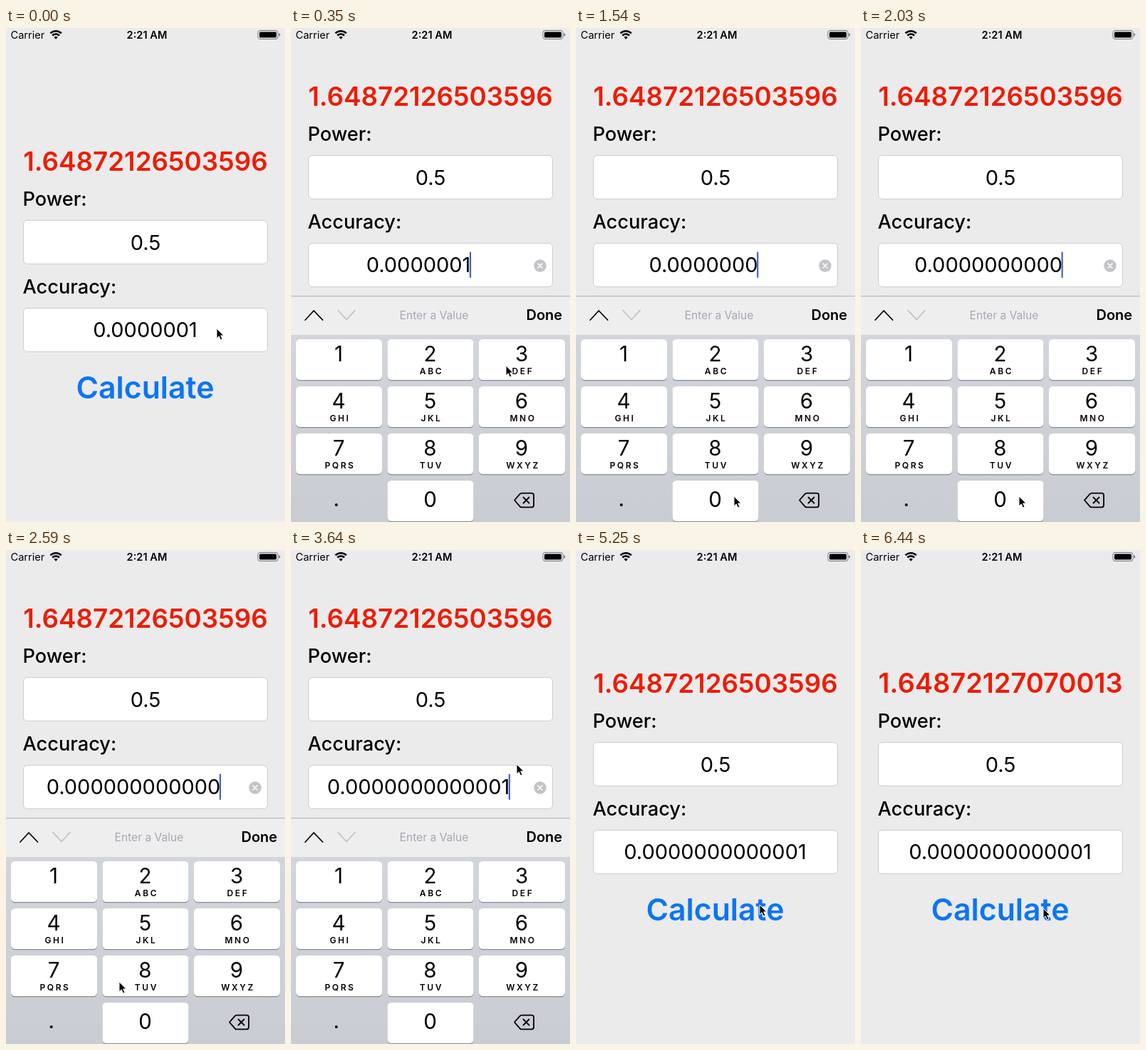
An HTML page for the animation above (6.51 s loop, 392x692 px).

```html
<!DOCTYPE html>
<html lang="en">
<head>
<meta charset="utf-8">
<title>Exponent calculator</title>
<style>
  html, body { margin: 0; width: 100%; height: 100%; overflow: hidden; background: #ebebeb; }
  svg { display: block; width: 392px; height: 692px; font-family: Inter, "Liberation Sans", sans-serif; font-optical-sizing: none; }
  .mid { text-anchor: middle; }
  .label { font-size: 27.2px; font-weight: 500; }
  .value { font-size: 29px; }
  .status { font-size: 14.6px; }
  .box { fill: #fff; stroke: #cdcdcd; }
  .letters { font-size: 12px; font-weight: 600; letter-spacing: 2.6px; }
  .line { fill: none; stroke: #000; stroke-width: 1.8; stroke-linecap: round; stroke-linejoin: round; }
</style>
</head>
<body>
<svg viewBox="0 0 392 692">
  <rect width="392" height="692" fill="#ebebeb"/>

  <g id="form">
    <text id="result" class="mid" x="196" y="200" font-weight="600" fill="#ee1c05"></text>
    <text class="label" x="23.5" y="249">Power:</text>
    <rect class="box" x="24.5" y="269.5" width="343" height="61" rx="5.5"/>
    <text class="value mid" x="196" y="310.5">0.5</text>
    <text class="label" x="23.5" y="372">Accuracy:</text>
    <rect class="box" x="24.5" y="392.5" width="343" height="61" rx="5.5"/>
    <text id="entry" class="value mid" y="433.3"></text>
    <g id="editing">
      <rect id="caret" y="404.5" width="2.2" height="36.5" rx="1" fill="#4a5fc1"/>
      <circle cx="350" cy="424" r="8.7" fill="#c4c4c8"/>
      <path d="M347 421l6 6m0-6l-6 6" stroke="#fff" stroke-width="1.6" stroke-linecap="round"/>
    </g>
    <text class="mid" x="195.5" y="519" font-size="42.8" font-weight="600" fill="#0b75f5">Calculate</text>
  </g>

  <g id="statusBar">
    <text class="status" x="6.5" y="15">Carrier</text>
    <g fill="none" stroke="#000" stroke-width="2.5">
      <path d="M62.4 7.4a11 11 0 0 1 15.4 0"/>
      <path d="M65.2 10.5a7 7 0 0 1 9.8 0"/>
    </g>
    <path d="M70.1 15.8l-2.6-2.9a3.8 3.8 0 0 1 5.2 0z"/>
    <text class="status mid" x="198" y="15" font-weight="600">2:21 AM</text>
    <rect x="354" y="3.5" width="28" height="12" rx="3" fill="none" stroke="#777"/>
    <rect x="356" y="5.5" width="24" height="8" rx="1.5"/>
    <path d="M383.3 7.3q2 .5 2 2.2t-2 2.2z" fill="#777"/>
  </g>

  <g id="keyboard">
    <linearGradient id="tray" x2="0" y2="1">
      <stop stop-color="#d2d5db"/>
      <stop offset="1" stop-color="#c9ccd2"/>
    </linearGradient>
    <rect y="375" width="392" height="55" fill="#eeeeef"/>
    <rect y="375" width="392" height="1.2" fill="#b6b7ba"/>
    <path class="line" d="M20 409l12-13 12.500 13"/>
    <path class="line" d="M66 395.500l12 13 12-13" style="stroke:#bfc1c5"/>
    <text class="mid" x="201" y="408" font-size="15.6" fill="#a5a9b3">Enter a Value</text>
    <text x="330.500" y="409.300" font-size="20" font-weight="600">Done</text>
    <rect y="430" width="392" height="262" fill="url(#tray)"/>
    <g id="keys"></g>
    <circle cx="63.700" cy="668" r="2"/>
    <path class="line" d="M314 661.500l7.500-8.600q1-1.200 2.600-1.200h14q3 0 3 3v13.600q0 3-3 3h-14q-1.600 0-2.600-1.200z"/>
    <path class="line" d="M326.500 657.500l8 8m0-8l-8 8"/>
  </g>

  <path id="pointer" d="M0 0v13.800l3.200-3 2.300 5.200 2.500-1.100-2.300-5h4.400z" stroke="#fff" stroke-width="1" stroke-linejoin="round"/>
</svg>
<script>
  const LOOP = 6510, STEP = 70;
  const KEYBOARD_HEIGHT = 317, FORM_LIFT = 91;
  const OPEN = 70, CLOSE = 4340, SLIDE = 260, ANSWER = 5600;
  const ERASE = 770, ONE = 2940;
  const ZEROS = [1470, 1680, 1860, 2030, 2200, 2380];

  // time, x, y of the pointer tip
  const PATH = [
    [0, 296, 421], [210, 296, 421], [350, 302, 473], [630, 325, 658],
    [910, 325, 658], [1330, 222, 656], [2380, 222, 656], [2590, 159, 605],
    [2870, 68, 466], [3150, 68, 466], [3640, 317, 300], [4060, 355, 402],
    [4410, 355, 402], [4900, 262, 499], [5250, 258, 497], [6440, 256, 502]
  ];

  const el = id => document.getElementById(id);
  const clamp = v => Math.min(1, Math.max(0, v));
  const easeOut = v => 1 - (1 - clamp(v)) ** 3;
  const move = (node, x, y) => node.setAttribute("transform", `translate(${x} ${y})`);

  function keyMarkup(digit, letters, col, row) {
    const x = 7 + col * 128.5, y = 436 + row * 66;
    const base = y + (digit === 0 ? 37 : 31);
    return `<rect x="${x}" y="${y + 1.3}" width="121" height="57" rx="5.5" fill="#898c91"/>
      <rect x="${x}" y="${y}" width="121" height="57" rx="5.5" fill="#fff"/>
      <text class="mid" x="${x + 60}" y="${base}" font-size="29.5">${digit}</text>
      <text class="letters mid" x="${x + 62}" y="${y + 48.5}">${letters}</text>`;
  }

  function buildKeys() {
    const letters = ["", "ABC", "DEF", "GHI", "JKL", "MNO", "PQRS", "TUV", "WXYZ"];
    el("keys").innerHTML =
      letters.map((s, i) => keyMarkup(i + 1, s, i % 3, Math.floor(i / 3))).join("") +
      keyMarkup(0, "", 1, 3);
  }

  function entryAt(t) {
    if (t < ERASE) return "0.0000001";
    const typed = ZEROS.filter(z => t >= z).length;
    return "0.000000" + "0".repeat(typed) + (t >= ONE ? "1" : "");
  }

  function pointerAt(t) {
    const next = PATH.findIndex(p => p[0] > t);
    if (next < 0) return PATH[PATH.length - 1].slice(1);
    const [t0, x0, y0] = PATH[next - 1], [t1, x1, y1] = PATH[next];
    const k = (t - t0) / (t1 - t0);
    return [x0 + (x1 - x0) * k, y0 + (y1 - y0) * k];
  }

  // The result label scales its type size to the label width.
  function showResult(text) {
    const node = el("result");
    if (node.textContent === text) return;
    node.textContent = text;
    node.style.fontSize = "36px";
    node.style.fontSize = 36 * 343.5 / node.getComputedTextLength() + "px";
  }

  function draw(t) {
    const editing = t >= OPEN && t < CLOSE;
    const up = easeOut((t - OPEN) / SLIDE) * (1 - easeOut((t - CLOSE) / SLIDE));
    move(el("form"), 0, -FORM_LIFT * up);
    move(el("keyboard"), 0, KEYBOARD_HEIGHT * (1 - up));
    move(el("pointer"), ...pointerAt(t));

    const entry = el("entry"), centre = editing ? 179 : 195.5;
    entry.textContent = entryAt(t);
    entry.setAttribute("x", centre);
    el("caret").setAttribute("x", centre + entry.getComputedTextLength() / 2 - 1.5);
    el("editing").style.display = editing ? "" : "none";

    showResult(t < ANSWER ? "1.64872126503596" : "1.64872127070013");
  }

  buildKeys();
  const start = performance.now();
  function tick() {
    const t = (performance.now() - start) % LOOP;
    draw(Math.floor(t / STEP) * STEP);
    requestAnimationFrame(tick);
  }
  tick();
</script>
</body>
</html>
```
